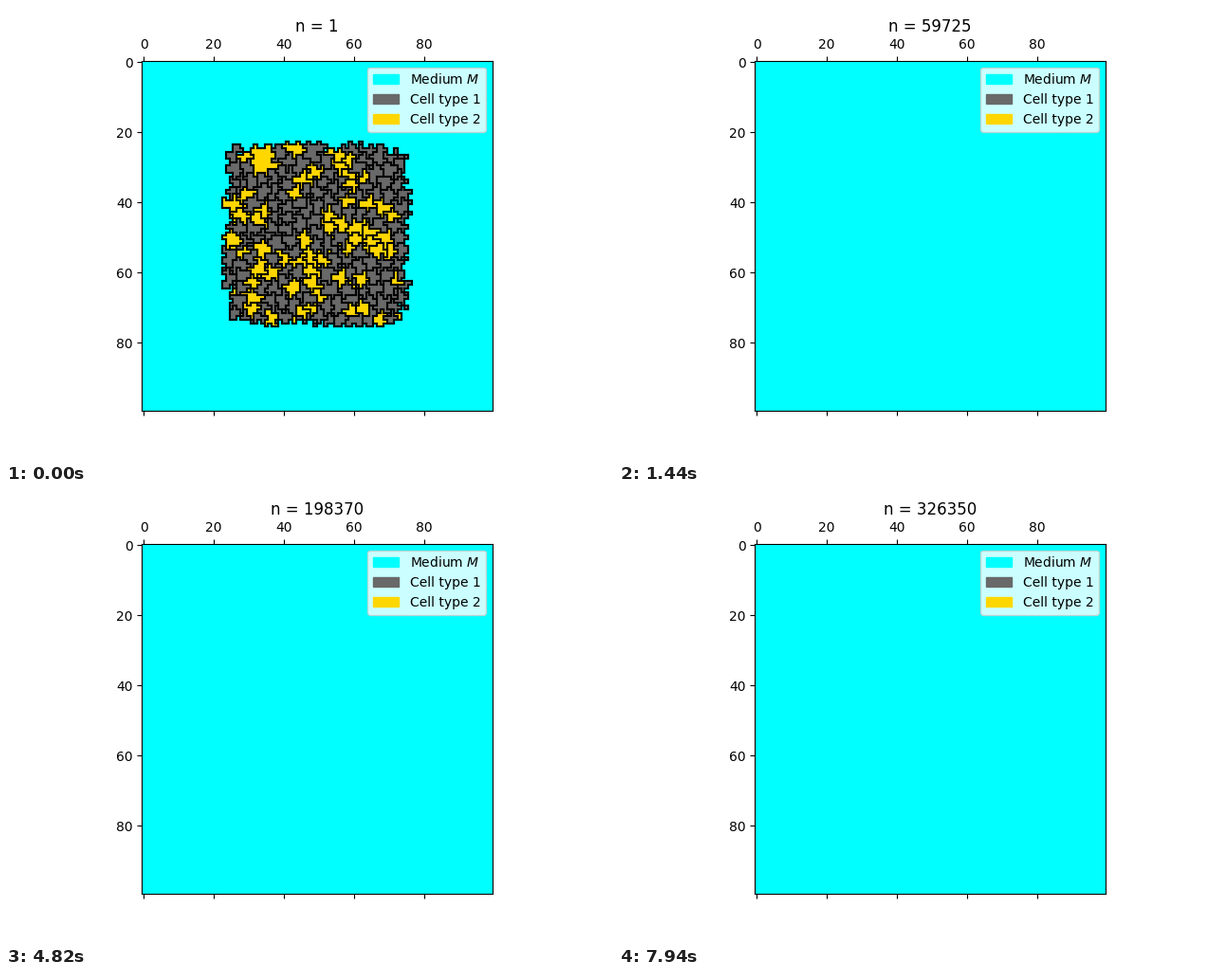
These frames come from a looping animation (640x480 px, 8 s). A matplotlib script:

```python
import numpy as np
import matplotlib.pyplot as plt
from matplotlib.animation import FuncAnimation
from matplotlib.collections import LineCollection
from matplotlib.colors import ListedColormap
from matplotlib.patches import Patch

SIZE = 100            # lattice sites per side
TICK = 20             # ms
TICKS = 400
STEP = 2133           # Monte Carlo steps between pictures
HOLDS = [1, 5, 1, 5, 1]   # ticks each picture stays, repeating
LAST_ALIVE = 4
MID = 49.3
COLORS = ["cyan", "dimgrey", "gold"]

BIG = (34, 28)        # the one large type 2 cell
# neighbourhoods where type 2 dominates
PATCHES = [BIG, (48, 31), (60, 32), (29, 45), (56, 43),
           (68, 47), (28, 66), (48, 62), (58, 67), (47, 72)]

rng = np.random.default_rng(7)


def scatter_cells(gap):
    """Random cell centres kept at least `gap` apart."""
    sites = [np.array(BIG, float)]
    for p in rng.uniform(24.5, 74.5, (5000, 2)):
        gaps = np.hypot(*(np.array(sites) - p).T)
        gaps[0] -= 2
        if gaps.min() > gap:
            sites.append(p)
    return np.array(sites)


sites = scatter_cells(2.8)
count = len(sites)
to_patch = np.linalg.norm(sites[:, None] - np.array(PATCHES), axis=2).min(axis=1)
chance = 0.22 + 0.6 * np.exp(-(to_patch / 5) ** 2)
kind = np.where(rng.random(count) < chance, 2, 1)
kind[0] = 2
reach = 25.6 + rng.uniform(-1.2, 1.2, count)
life = rng.uniform(1, LAST_ALIVE + 0.9, count)
bonus = np.zeros(count)
bonus[0] = 2


def label_lattice(k):
    """Cell number at every lattice site, -1 for the medium."""
    y, x = np.mgrid[:SIZE, :SIZE].astype(float)
    u = x + 0.7 * np.sin(1.9 * y + 0.3 * x)
    v = y + 0.7 * np.sin(2.1 * x - 0.4 * y)
    spread = 1.04 if k else 1.0
    px, py = ((sites - MID) * spread + MID).T
    dist = np.hypot(u[..., None] - px, v[..., None] - py) - bonus
    owner = dist.argmin(axis=2)
    near = dist.min(axis=2)
    edge = (np.abs(u - MID) ** 7 + np.abs(v - MID) ** 7) ** (1 / 7)
    alive = edge < reach[owner] * spread
    if k:
        alive &= near < 3.4 * (1 - k / life[owner]) + 0.5
        alive &= life[owner] > k
    return np.where(alive, owner, -1)


def outlines(labels):
    """Unit segments wherever two neighbouring sites differ."""
    rows, cols = np.nonzero(labels[:, 1:] != labels[:, :-1])
    segs = [[(c + 0.5, r - 0.5), (c + 0.5, r + 0.5)] for r, c in zip(rows, cols)]
    rows, cols = np.nonzero(labels[1:] != labels[:-1])
    segs += [[(c - 0.5, r + 0.5), (c + 0.5, r + 0.5)] for r, c in zip(rows, cols)]
    return segs


stages = []
for k in range(LAST_ALIVE + 1):
    labels = label_lattice(k)
    stages.append((np.where(labels < 0, 0, kind[labels]), outlines(labels)))

fig, ax = plt.subplots(figsize=(6.4, 4.8), dpi=100)
ax.set_facecolor(COLORS[0])
image = ax.matshow(stages[0][0], cmap=ListedColormap(COLORS), vmin=0, vmax=2,
                   interpolation="nearest")
borders = LineCollection(stages[0][1], colors="black", linewidths=1.5,
                         capstyle="projecting")
ax.add_collection(borders, autolim=False)
names = ["Medium $M$", "Cell type 1", "Cell type 2"]
ax.legend(handles=[Patch(color=c, label=n) for c, n in zip(COLORS, names)],
          loc="upper right")
title = ax.set_title("n = 1", pad=5.3)


def update(tick):
    cycle, phase = divmod(tick, sum(HOLDS))
    k = len(HOLDS) * cycle + int(np.searchsorted(np.cumsum(HOLDS), phase, side="right"))
    title.set_text(f"n = {1 + STEP * k}")
    alive = k <= LAST_ALIVE
    image.set_visible(alive)
    borders.set_visible(alive)
    if alive:
        image.set_data(stages[k][0])
        borders.set_segments(stages[k][1])
    return image, borders, title


anim = FuncAnimation(fig, update, frames=TICKS, interval=TICK,
                     repeat=True, repeat_delay=0)
plt.show()
```
